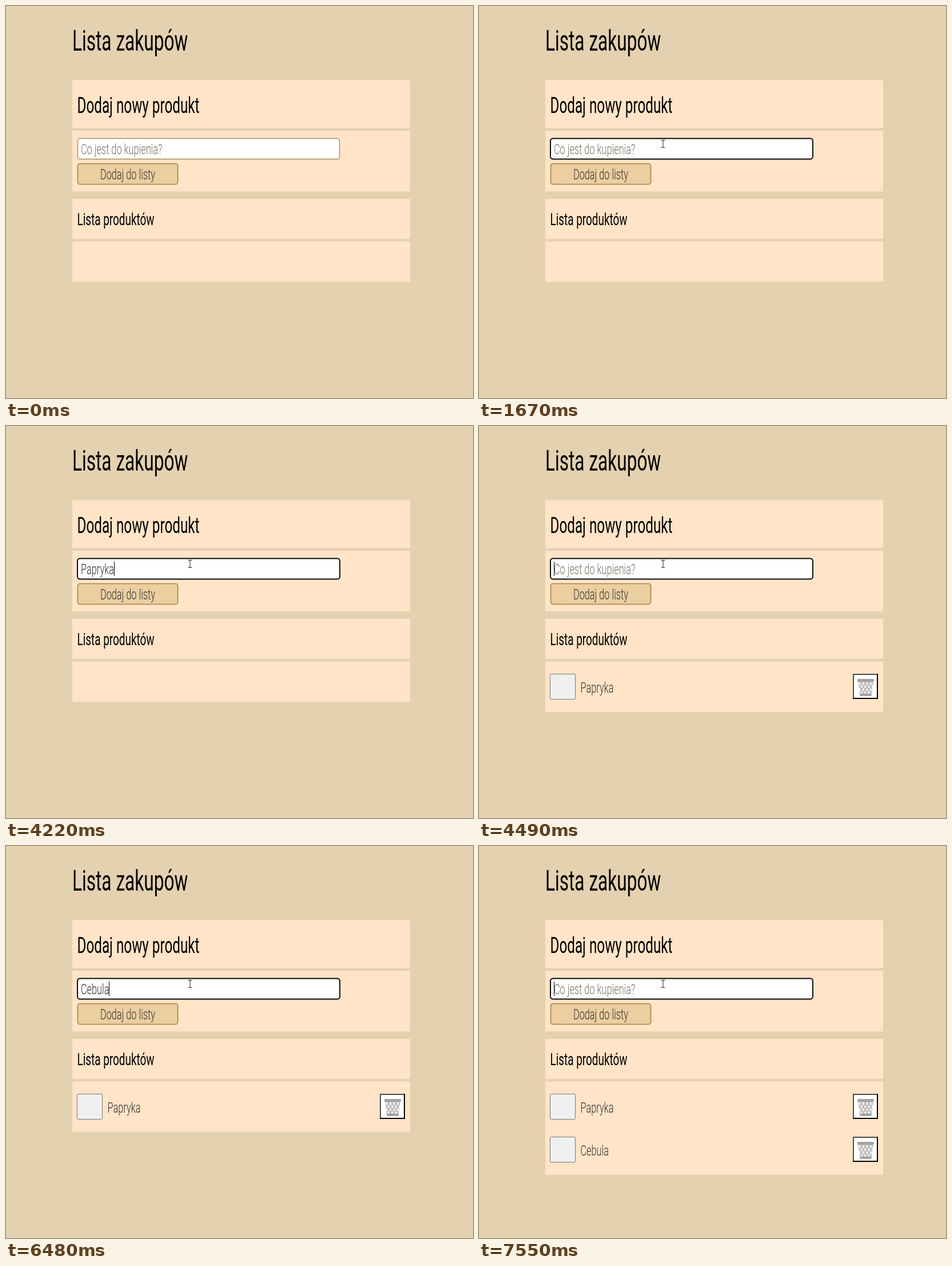
These frames come from a looping animation (817x685 px, 8000 ms). An HTML page:

```html
<!DOCTYPE html>
<html lang="pl">
<head>
<meta charset="utf-8">
<title>Lista zakupów</title>
<style>
  html, body { margin: 0; width: 100%; height: 100%; overflow: hidden; background: #e4d1b0; }
  svg { display: block; }
  text { font: 300 25.7px Roboto, sans-serif; fill: #333; }
  .heading { font-weight: 400; fill: #000; }
  .hint { fill: #757569; }
  .panel { fill: #ffe4c7; }
</style>
</head>
<body>
<svg id="stage" width="817" height="685" viewBox="0 0 817 685"></svg>
<script>
const LOOP = 8000;
const CONDENSE = 0.635; // one narrow face for all text
const FIELD_X = 131;

const label = (x, y, text, attrs = '') =>
  `<text transform="translate(${x} ${y}) scale(${CONDENSE} 1)" ${attrs}>${text}</text>`;
const heading = (x, y, size, text) =>
  label(x, y, text, `class="heading" style="font-size:${size}px"`);
const panel = (y, bottom, attrs = '') =>
  `<rect class="panel" x="116" y="${y}" width="591" height="${bottom - y}" ${attrs}/>`;

function lattice() {
  let d = '';
  for (let x = 640; x < 716; x += 6.5) d += `M${x} 445l16 26M${x} 445l-16 26`;
  return `<path d="${d}" stroke="#b3b2af" stroke-width="1.7" clip-path="url(#basket)"/>`;
}

const row = (name, dy) => `
  <g class="row" transform="translate(0 ${dy})">
    <rect x="124.5" y="433.5" width="44" height="44" rx="2" fill="#efefef" stroke="#767676"/>
    ${label(177.5, 465.5, name)}
    <path d="M654 433h44v44h-44z" fill="#fff"/>
    <path d="M655 477v-43h43" fill="none" stroke="#4c4c4c" stroke-width="2"/>
    <path d="M654 476h43v-43" fill="none" stroke="#000" stroke-width="2"/>
    <path d="M663 445h27l-3.5 25.5h-20z" fill="#f1f1ef"/>
    ${lattice()}
    <rect x="662" y="442" width="29" height="5" rx="1.5" fill="#a4a3a0"/>
    <path d="M666 467.5h21l-.7 4.5h-19.6z" fill="#a4a3a0"/>
  </g>`;

const stage = document.getElementById('stage');
stage.innerHTML = `
  <clipPath id="basket"><path d="M663 445h27l-3.5 25.5h-20z"/></clipPath>
  <rect width="817" height="685" fill="#e4d1b0"/>
  ${heading(116, 78, 49.8, 'Lista zakupów')}
  ${panel(129.5, 213.5)}
  ${heading(124.5, 187, 38.2, 'Dodaj nowy produkt')}
  ${panel(218, 324)}
  <rect x="125.5" y="231.5" width="458" height="36" rx="4" fill="#fff" stroke="#a58a62" stroke-width="1.4"/>
  <rect id="ring" x="125" y="231.5" width="459" height="36" rx="4.5" fill="#fff" stroke="#101010" stroke-width="2"/>
  ${label(FIELD_X, 258.5, 'Co jest do kupienia?', 'id="hint" class="hint"')}
  ${label(FIELD_X, 258.5, '', 'id="typed"')}
  <rect id="caret" y="237" width="1" height="25"/>
  <rect x="125.5" y="275.5" width="175" height="36" rx="4" fill="#eccfa0" stroke="#a87f48" stroke-width="1.6"/>
  ${label(213, 302.5, 'Dodaj do listy', 'text-anchor="middle"')}
  ${panel(337, 407)}
  ${heading(124.5, 383, 29.8, 'Lista produktów')}
  ${panel(411.5, 482, 'id="list"')}
  ${row('Papryka', 0)}
  ${row('Cebula', 75)}
  <g id="pointer">
    <circle id="halo" r="13" fill="#ffff32" fill-opacity=".65"/>
    <path id="arrow" d="M0 0v16l3.7-3.5 2.5 6 2.4-1-2.5-5.8h5.2z" fill="#fff" stroke="#000"/>
    <path id="beam" d="M-1.5-5.5h2.5l1 1 1-1h2.5M-1.5 7.5h2.5l1-1 1 1h2.5M2-4.5v11" fill="none" stroke="#333" stroke-width="1.1"/>
  </g>`;

const byId = id => document.getElementById(id);
const [ring, hint, typed, caret, list, pointer, halo, arrow, beam] =
  ['ring', 'hint', 'typed', 'caret', 'list', 'pointer', 'halo', 'arrow', 'beam'].map(byId);
const rows = [...document.querySelectorAll('.row')];
const show = (el, on) => el.setAttribute('visibility', on ? 'visible' : 'hidden');

const typing = (word, times) => times.map((t, i) => [t, word.slice(0, i + 1), true]);

// [time, field text, caret visible]
const entries = [
  [0, '', false],
  [1140, '', true], [1670, '', false], [2140, '', true], [2670, '', false],
  ...typing('Papryka', [3100, 3360, 3490, 3690, 3830, 4090, 4220]),
  [4490, '', true], [4690, '', false], [5220, '', true],
  ...typing('Cebula', [5490, 5820, 6030, 6210, 6410, 6480]),
  [7020, '', false], [7550, '', true],
];

const path = [
  [734, 648], [700, 622], [655, 588], [603, 548], [548, 500], [490, 425],
  [432, 338], [388, 258], [360, 208], [347, 199], [339, 220], [332, 243],
];
const PATH_START = 120, PATH_END = 870;

function pointerAt(t) {
  if (t >= 1070) return [320, 240];
  const step = (t - PATH_START) / (PATH_END - PATH_START) * (path.length - 1);
  return path[Math.max(0, Math.min(path.length - 1, Math.floor(step)))];
}

function draw(t) {
  const [, text, caretOn] = entries.findLast(([start]) => start <= t);
  if (typed.textContent !== text) typed.textContent = text;
  show(hint, !text);
  show(caret, caretOn);
  const width = text ? typed.getComputedTextLength() * CONDENSE : 0;
  caret.setAttribute('x', Math.round(FIELD_X + width));
  show(ring, t >= 1140);

  const count = t >= 7020 ? 2 : t >= 4490 ? 1 : 0;
  rows.forEach((el, i) => show(el, i < count));
  list.setAttribute('height', [70.5, 88, 163][count]);

  const [x, y] = pointerAt(t);
  const visible = t >= PATH_START;
  const overField = y > 231 && y < 268 && x < 584;
  pointer.setAttribute('transform', `translate(${x} ${y})`);
  show(halo, visible && t < 1210);
  show(arrow, visible && !overField);
  show(beam, visible && overField);
}

const start = performance.now();
function tick() {
  draw((performance.now() - start) % LOOP);
  requestAnimationFrame(tick);
}
tick();
</script>
</body>
</html>
```
